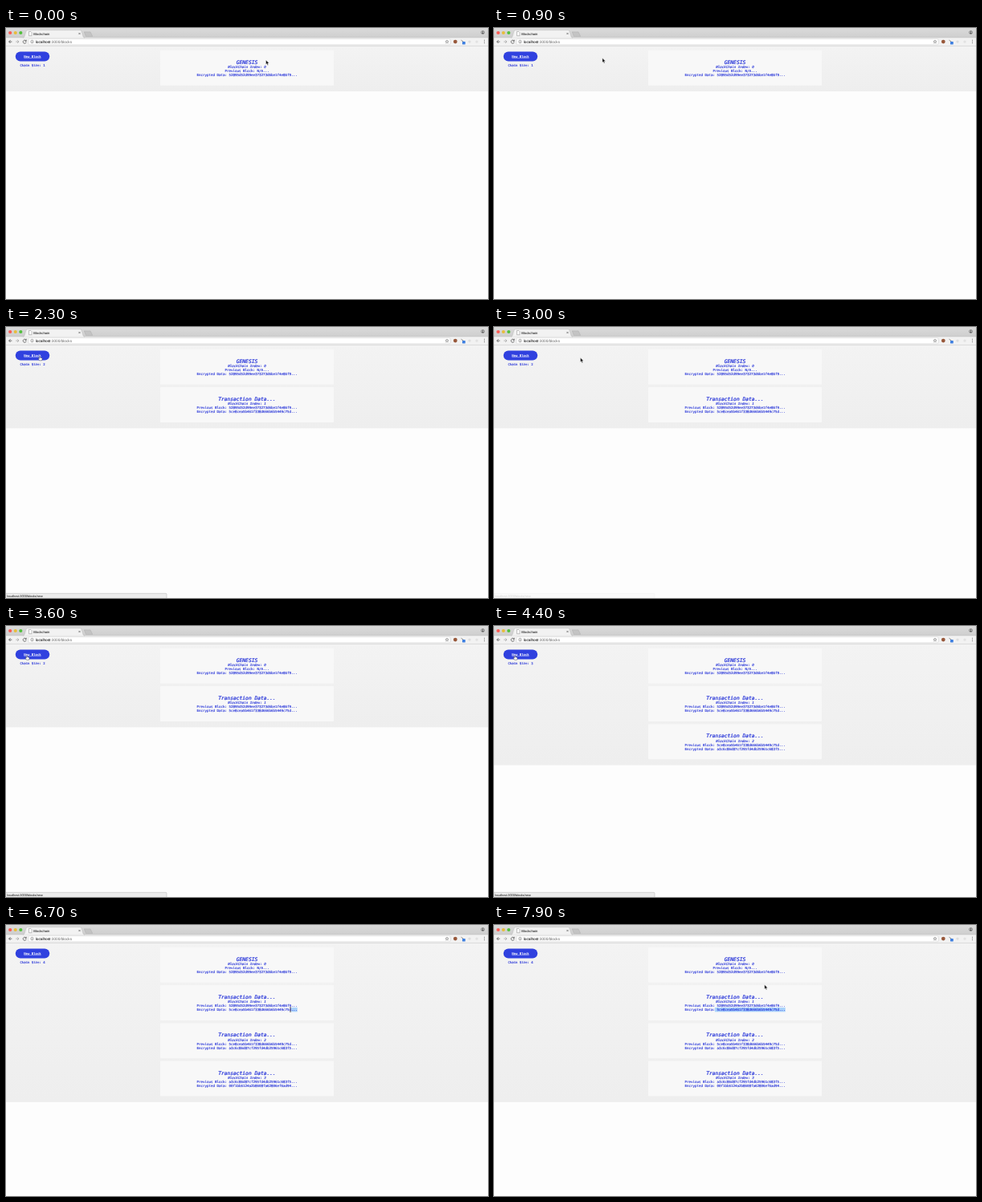
These frames come from a looping animation (600x338 px, 8 s). An HTML page:

```html
<!DOCTYPE html>
<html lang="en">
<head>
<meta charset="utf-8">
<title>Blockchain</title>
<style>
html, body { margin: 0; width: 100%; height: 100%; overflow: hidden; background: #fdfdfd; }
svg { display: block; width: 100vw; height: 100vh; }
text { text-rendering: geometricPrecision; white-space: pre; }
.ui { font-family: "Liberation Sans", Arial, sans-serif; }
.ui text { stroke: #333; stroke-width: .06px; }
.mono { font-family: "DejaVu Sans Mono", monospace; font-size: 4.167px; fill: #2230d8; stroke: #2230d8; stroke-width: .13px; text-anchor: middle; }
.title { font-size: 6.25px; stroke-width: .22px; }
.slant { font-style: italic; }
.side { font-size: 3.97px; }
.label { fill: #fff; stroke: none; font-weight: bold; }
</style>
</head>
<body>
<svg id="stage" viewBox="0 0 600 338" preserveAspectRatio="none">
  <defs>
    <linearGradient id="bar" x1="0" y1="0" x2="0" y2="1">
      <stop offset="0" stop-color="#dadada"/><stop offset="1" stop-color="#cecece"/>
    </linearGradient>
    <linearGradient id="page" x1="0" y1="0" x2="0" y2="1">
      <stop offset="0" stop-color="#f3f3f3"/><stop offset="1" stop-color="#eeeeee"/>
    </linearGradient>
  </defs>
  <rect width="600" height="338" fill="#fdfdfd"/>
  <rect id="panel" y="22" width="600" fill="url(#page)"/>
  <g id="cards"></g>

  <rect x="11.8" y="29.4" width="42.4" height="12" rx="6" fill="#3041df"/>
  <text class="mono side label" x="33" y="36.7">New Block</text>
  <path d="M22.3 37.6H43.7" stroke="#fff" stroke-width=".4"/>
  <text id="size" class="mono side" x="33" y="48.4"></text>

  <g class="ui">
    <rect width="600" height="12.2" fill="url(#bar)"/>
    <rect y="12" width="600" height="10.3" fill="#f2f2f2"/>
    <path d="M0 12H600" stroke="#b4b4b4" stroke-width=".4"/>
    <path d="M0 22.4H600" stroke="#bcbcbc" stroke-width=".5"/>
    <path d="M21.5 12.3C24 12 24 2.7 26.5 2.7H92.5C95 2.7 95 12 97.5 12.3Z" fill="#f2f2f2" stroke="#acacac" stroke-width=".35"/>
    <path d="M22 12.3H97" stroke="#f2f2f2" stroke-width=".9"/>
    <path d="M97.3 4.9H105L107.6 10.3H99.5Z" fill="#c4c4c4" stroke="#a5a5a5" stroke-width=".4" stroke-linejoin="round"/>
    <g id="lights"></g>
    <path d="M28.5 4.5H30.8L32.1 5.8V9.7H28.5Z" fill="#fff" stroke="#666" stroke-width=".4"/>
    <text x="34.2" y="8.6" font-size="4.15" fill="#222">Blockchain</text>
    <path d="M90.4 5.9L92.6 8.1M92.6 5.9L90.4 8.1" stroke="#444" stroke-width=".55"/>
    <g fill="none" stroke="#4a4a4a" stroke-width=".75">
      <path id="back" d="M7.4 17.1H3.7M5.5 15.2L3.6 17.1L5.5 19"/>
      <use href="#back" transform="translate(19.5 0) scale(-1 1)" opacity=".45"/>
      <path d="M24.9 16.1A2 2 0 1 0 25.2 17.6M25.2 14.7V16.4H23.5"/>
    </g>
    <rect x="28" y="13.6" width="525" height="7.2" rx="1" fill="#fff" stroke="#c3c3c3" stroke-width=".4"/>
    <circle cx="32.5" cy="17.1" r="1.8" fill="none" stroke="#555" stroke-width=".45"/>
    <path d="M32.5 16.8V18.2M32.5 15.9V16.3" stroke="#555" stroke-width=".5"/>
    <text x="36.7" y="18.6" font-size="4.76" fill="#111">localhost<tspan fill="#666" stroke="none">:3000/blocks</tspan></text>
    <path id="star" fill="none" stroke="#555" stroke-width=".45"/>
    <circle cx="559.3" cy="17.1" r="2.4" fill="#98583a"/>
    <path d="M566.5 15.2L569.5 17.2" stroke="#777" stroke-width=".8"/>
    <rect x="568" y="17" width="3.8" height="3.4" rx=".4" fill="#3e7fe0"/>
    <circle cx="577" cy="17.1" r="1.7" fill="#dedede"/>
    <circle cx="586" cy="17.1" r="1.7" fill="#e2e2e2"/>
    <path d="M595.6 15.2V19.2" stroke="#555" stroke-width=".9" stroke-linecap="round" stroke-dasharray="0 1.8"/>
    <circle cx="593.5" cy="5.5" r="2" fill="none" stroke="#444" stroke-width=".5"/>
    <circle cx="593.5" cy="4.9" r=".75" fill="#444"/>
    <path d="M592.1 6.9Q593.5 5.3 594.9 6.9Z" fill="#444"/>
  </g>

  <g id="status" class="ui">
    <path d="M-1 332.3H199Q200 332.3 200 333.3V339H-1Z" fill="#ececec" stroke="#aaa" stroke-width=".45"/>
    <text x="1.3" y="336.5" font-size="3.8" fill="#333">localhost:3000/blocks/new</text>
  </g>

  <g id="pointer">
    <path id="arrow" d="M0 0V5.5L1.25 4.4L2.1 6.4L3.1 6L2.25 4H4Z" fill="#111" stroke="#fff" stroke-width=".4"/>
    <path id="hand" d="M-.6 .5Q0 -.5 .6 .5V2L2.7 2.5Q3.3 2.8 3.1 3.6L2.5 5.5H-.4L-1.9 3.4Q-1.9 2.6 -.6 3.1Z" fill="#fff" stroke="#222" stroke-width=".4"/>
    <path id="beam" d="M-.8 -2.7H.8M0 -2.7V2.7M-.8 2.7H.8" fill="none" stroke="#222" stroke-width=".6"/>
  </g>
</svg>
<script>
const LOOP = 8000, STEP = 100;
const PITCH = 47.3, CHAR = 2.508, CHARS = 50, LABEL = 15;
const LEFT = 300 - CHARS / 2 * CHAR;
const DRAG = 6590;
const $ = id => document.getElementById(id);

const hashes = [
  "52895d52d99ee373273d6be1f4e86f9",
  "5ce8cea5b461f338d666b6b5449c75d",
  "a3c6c86d87cf295fd4db25961c683f5",
  "00f1bb6124a2b8608fa62806ef6ad94"
];
const added = [0, 1900, 4000, 5100];

const home = { x: 323.5, y: 40 };
const moves = [
  { from: 100, to: 1400, x: 42, y: 36.3 },
  { from: 2500, to: 3000, x: 107.5, y: 38.3 },
  { from: 3050, to: 3500, x: 26, y: 36.7 },
  { from: 5200, to: 5400, x: 58.7, y: 22.2 },
  { from: 5400, to: 6400, x: 362, y: 105.5 },
  { from: DRAG, to: DRAG + 590, x: LEFT + LABEL * CHAR, y: 105.5 },
  { from: 7300, to: 7900, x: 336.7, y: 74.4 }
];
const hovers = [{ from: 1200, to: 2600 }, { from: 3350, to: 5050 }];

const ramp = (t, from, to) => Math.min(1, Math.max(0, (t - from) / (to - from)));
const ease = p => p * p * (3 - 2 * p);
const show = (el, on) => el.setAttribute("visibility", on ? "visible" : "hidden");

function pointerAt(t) {
  return moves.reduce((p, m) => {
    const e = ease(ramp(t, m.from, m.to));
    return { x: p.x + (m.x - p.x) * e, y: p.y + (m.y - p.y) * e };
  }, home);
}

// the link hint lingers a little after the pointer has left
function hintAt(t) {
  return hovers.reduce((sum, h) =>
    sum + ramp(t, h.from, h.from + 150) - ramp(t, h.to + 150, h.to + 450), 0);
}

function line(y, text, cls = "") {
  return `<text class="mono ${cls}" x="300" y="${y}">${text}</text>`;
}

function card(hash, i) {
  const prev = i ? hashes[i - 1] : "N/A";
  const mark = i === 1 ? '<rect id="mark" y="55.6" height="5.4" fill="#a9d2fb"/>' : "";
  return `<g transform="translate(0 ${i * PITCH})">
    <rect x="192" y="27.7" width="216" height="44" rx=".8" fill="#f8f8f8"/>${mark}` +
    line(44.7, i ? "Transaction Data..." : "GENESIS", "title slant") +
    line(50, `BlockChain Index: ${i}`, "slant") +
    line(55.2, `Previous Block: ${prev}...`) +
    line(60.2, `Encrypted Data: ${hash}...`) + "</g>";
}

$("cards").innerHTML = hashes.map(card).join("");
const cards = [...$("cards").children];

$("lights").innerHTML = ["#fb5c55", "#e7bd3b", "#52c03d"].map((c, i) =>
  `<circle cx="${5.2 + 6.55 * i}" cy="6" r="2.1" fill="${c}"/>`).join("");

$("star").setAttribute("d", "M" + Array.from({ length: 10 }, (_, i) => {
  const r = i % 2 ? 0.95 : 2.2, a = i * Math.PI / 5;
  return `${549 + r * Math.sin(a)} ${17.2 - r * Math.cos(a)}`;
}).join("L") + "Z");

function draw(t) {
  const count = added.filter(a => t >= a).length;
  cards.forEach((c, i) => show(c, i < count));
  $("panel").setAttribute("height", 57 + (count - 1) * PITCH);
  $("size").textContent = `Chain Size: ${count}`;
  $("status").setAttribute("opacity", hintAt(t));

  const { x, y } = pointerAt(t);
  const overButton = x > 12 && x < 54 && y > 29.4 && y < 41.6;
  const overText = x > LEFT && x < 363 && y > 92 && y < 109;
  $("pointer").setAttribute("transform", `translate(${x} ${y})`);
  show($("hand"), overButton);
  show($("beam"), overText);
  show($("arrow"), !overButton && !overText);

  // selection runs from the line's end back to the drag position, by whole characters
  const dragX = pointerAt(Math.min(t, DRAG + 590)).x;
  const first = t < DRAG ? CHARS : Math.round((dragX - LEFT) / CHAR);
  $("mark").setAttribute("x", LEFT + first * CHAR);
  $("mark").setAttribute("width", (CHARS - first) * CHAR);
}

function tick() {
  const t = performance.now() % LOOP;
  draw(Math.floor(t / STEP) * STEP);
  requestAnimationFrame(tick);
}
tick();
</script>
</body>
</html>
```
